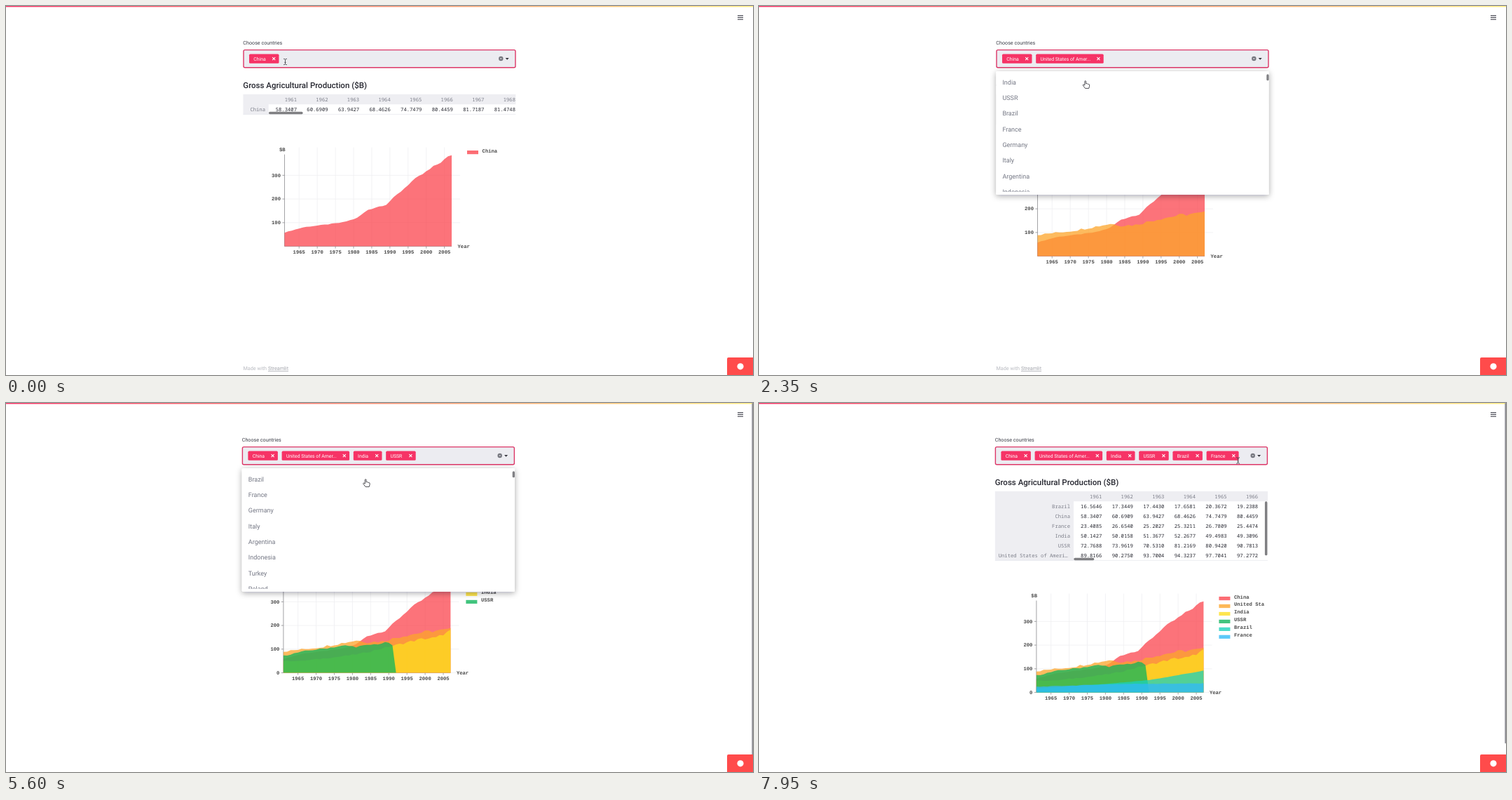
Recreate the animation shown at these times as an HTML page. Size 1066 by 526 pixels, loop 8 s.

```html
<!DOCTYPE html>
<html lang="en">
<head>
<meta charset="utf-8">
<title>Gross Agricultural Production</title>
<style>
  html, body { margin: 0; width: 100%; height: 100%; overflow: hidden; background: #fff; }
  svg { display: block; width: 1066px; height: 526px; font-family: Roboto, "Open Sans", sans-serif; text-rendering: geometricPrecision; }
  text { white-space: pre; }
  .label { font-size: 7.2px; fill: #3c3e48; }
  .title { font-size: 11.5px; font-weight: 500; fill: #262730; }
  .tag { font-size: 6.85px; fill: #fff; }
  .item { font-size: 9px; fill: #747784; }
  .foot { font-size: 7.25px; fill: #b9bbc1; }
  .cell { font: 7.2px "Noto Sans Mono", "DejaVu Sans Mono", monospace; fill: #262730; }
  .head { fill: #7c7e89; }
  .axis { font: bold 7.2px "Liberation Mono", "DejaVu Sans Mono", monospace; fill: #4a4a4a; }
</style>
</head>
<body>
<svg id="stage" viewBox="0 0 1066 526">
  <defs>
    <linearGradient id="bar"><stop stop-color="#f63366"/><stop offset="1" stop-color="#ffee80"/></linearGradient>
    <clipPath id="listClip"><rect x="338" y="93" width="390" height="172"/></clipPath>
    <clipPath id="tableClip"><rect x="338" y="120" width="389.6" height="120"/></clipPath>
    <filter id="shadow" x="-5%" y="-15%" width="110%" height="135%">
      <feDropShadow dx="0" dy="2" stdDeviation="4.5" flood-color="#101020" flood-opacity=".34"/>
    </filter>
  </defs>
</svg>
<script>
const LOOP = 8000, X0 = 397.5, STEP = 5.185, UNIT = 0.3375;
const COUNTRIES = ['China', 'United States of America', 'India', 'USSR', 'Brazil', 'France', 'Germany',
  'Italy', 'Argentina', 'Indonesia', 'Turkey', 'Poland', 'Spain'];
const TAG_WIDTHS = [42.5, 96.5, 40.7, 42.5, 42.5, 46], TAG_GAP = 5.7;

// keys: [years after 1961, value]; rough: relative size of the yearly wobble
const SERIES = [
  { color: 'rgb(251,68,78)', rough: 0.015, cells: '58.3407 60.6909 63.9427 68.4626 74.7479 80.4459 81.7187 81.4748',
    keys: [[0, 58], [5, 80], [16, 101], [20, 120], [23, 155], [28, 177], [35, 274], [46, 387]] },
  { color: 'rgb(253,164,42)', rough: 0.04, cells: '89.8166 90.2750 93.7004 94.3237 97.7041 97.2772',
    keys: [[0, 90], [10, 108], [20, 137], [23, 130], [27, 132], [33, 156], [39, 173], [46, 183]] },
  { color: 'rgb(254,222,30)', rough: 0.035, cells: '50.1427 50.0158 51.3677 52.2677 49.4983 49.3096',
    keys: [[0, 50], [5, 50], [15, 67], [21, 80], [29, 110], [38, 143], [42, 148], [46, 178]] },
  { color: 'rgb(14,180,90)', rough: 0.03, cells: '72.7688 73.9619 70.5310 81.2169 80.9420 90.7813',
    keys: [[0, 72], [6, 92], [17, 115], [20, 110], [29, 128], [30, 113], [31, 0], [46, 0]] },
  { color: 'rgb(26,210,187)', rough: 0.015, cells: '16.5646 17.3449 17.4430 17.6581 20.3672 19.2388',
    keys: [[0, 17], [19, 36], [31, 52], [46, 92]] },
  { color: 'rgb(48,186,247)', rough: 0.04, cells: '23.4085 26.6540 25.2027 25.3211 26.7809 25.4474',
    keys: [[0, 24], [23, 36], [46, 38]] }
];

// A list opens, the pointer reaches (x, y) and picks; the other times follow from these
const ROUNDS = [
  { open: 50, pick: 900, x: 392.5, y: 110 },
  { open: 1750, pick: 2500, x: 467, y: 112 },
  { open: 3300, pick: 4200, x: 484, y: 116 },
  { open: 5050, pick: 5800, x: 514.5, y: 114 },
  { open: 6650, pick: 7300, x: 596, y: 104 }
];
const RELOAD = 300, FADE = 100, SCROLL_SHIFT = 1.6;

const stage = document.getElementById('stage');
function el(name, attrs = {}, parent = stage, text) {
  const node = document.createElementNS('http://www.w3.org/2000/svg', name);
  for (const key in attrs) node.setAttribute(key, attrs[key]);
  if (text !== undefined) node.textContent = text;
  return parent.appendChild(node);
}
const group = (parent, attrs) => el('g', attrs, parent);
const rect = (parent, x, y, width, height, fill, rx = 0) => el('rect', { x, y, width, height, fill, rx }, parent);
const line = (parent, d, stroke, width = 0.8) => el('path', { d, stroke, 'stroke-width': width, fill: 'none' }, parent);
const label = (parent, cls, x, y, text, anchor = 'start') =>
  el('text', { class: cls, x, y, 'text-anchor': anchor }, parent, text);
const cross = (parent, x, y, r, color, width) =>
  line(parent, `M${x - r} ${y - r}l${2 * r} ${2 * r}m0 ${-2 * r}l${-2 * r} ${2 * r}`, color, width);

const clamp = v => Math.max(0, Math.min(1, v));
const ease = k => k * k * (3 - 2 * k);
const mix = (a, b, k) => a + (b - a) * k;
const noise = n => { const v = Math.sin(n * 12.9898) * 43758.5453; return 2 * (v - Math.floor(v)) - 1; };
const tagStart = i => TAG_WIDTHS.slice(0, i).reduce((x, w) => x + w + TAG_GAP, 347);
const tagEnd = i => tagStart(i) + TAG_WIDTHS[i];

function valueAt({ keys, rough }, year, seed) {
  const i = Math.max(1, keys.findIndex(k => k[0] >= year));
  const [t0, v0] = keys[i - 1], [t1, v1] = keys[i];
  return mix(v0, v1, (year - t0) / (t1 - t0)) * (1 + rough * noise(year + 50 * seed));
}

function drawTable(g, n) {
  const wide = n > 1, bottom = 140 + 14 * n, cols = wide ? 6 : 8;
  const split = wide ? 450.6 : 374.7, first = wide ? 490.9 : 415;
  const colX = i => first + 44.57 * i;
  const box = group(g, { 'clip-path': 'url(#tableClip)' });
  rect(box, 338.4, 125.8, 389.2, 14.4, '#eeeef2');
  rect(box, 338.4, 140, split - 338.4, 14 * n + 0.5, '#eeeef2');
  line(box, `M338.4 ${bottom + 0.4}H727.6`, '#e6e7ec', 0.7);
  for (let i = 0; i < cols; i++) label(box, 'cell head', colX(i), 135.8, 1961 + i, 'end');
  COUNTRIES.slice(0, n).sort().forEach((name, row) => {
    const y = 149.8 + 14 * row;
    if (name.length > 8) label(box, 'cell head', 343.3, y, name.slice(0, 22) + '…');
    else label(box, 'cell head', wide ? 445.6 : 370, y, name, 'end');
    const cells = SERIES[COUNTRIES.indexOf(name)].cells.split(' ');
    cells.slice(0, cols).forEach((v, i) => label(box, 'cell', colX(i), y, v, 'end'));
  });
  rect(box, split + 0.3, bottom - 3.2, wide ? 29 : 48.6, 3.4, '#7f7f82', 1.6);
  if (wide) rect(box, 723.5, 140.3, 3.5, 14 * n - 7, '#7f7f82', 1.6);
}

function drawChart(g, n) {
  const base = 328.6 + 14 * n, right = X0 + 46 * STEP;
  const yearX = year => X0 + (year - 1961) * STEP, valueY = v => base - v * UNIT;
  for (let year = 1965; year <= 2005; year += 5) {
    line(g, `M${yearX(year)} ${base - 141}V${base}`, '#efeff2');
    line(g, `M${yearX(year)} ${base}v3`, '#8c8c90');
    label(g, 'axis', yearX(year), base + 10.5, year, 'middle');
  }
  for (let v = n > 3 ? 0 : 100; v <= 300; v += 100) {
    line(g, `M${X0} ${valueY(v)}H648`, '#efeff2');
    line(g, `M${X0 - 3} ${valueY(v)}h3`, '#8c8c90');
    label(g, 'axis', 392, valueY(v) + 2.3, v, 'end');
  }
  line(g, `M${X0} ${base - 131}V${base}H${right}`, '#8c8c90');
  SERIES.slice(0, n).forEach((s, i) => {
    let d = `M${X0} ${base}`;
    for (let year = 0; year <= 46; year++) d += `L${X0 + year * STEP} ${valueY(valueAt(s, year, i))}`;
    el('path', { d: `${d}V${base}Z`, fill: s.color, 'fill-opacity': 0.75 }, g);
    const y = base - 136.6 + 10.95 * i;
    rect(g, 658, y, 16, 5.2, s.color).setAttribute('fill-opacity', 0.78);
    label(g, 'axis', 679.6, y + 2.5, COUNTRIES[i].slice(0, 10));
  });
  label(g, 'axis', 394.3, base - 136.1, '$B', 'middle');
  label(g, 'axis', 644.5, base + 2.5, 'Year');
}

function drawData(n) {
  const g = group(page);
  drawTable(g, n);
  drawChart(g, n);
  const foot = label(g, 'foot', 338.5, n < 3 ? 519 : 479.3 + 14 * n, 'Made with ');
  el('tspan', { fill: '#a3a5ac', 'text-decoration': 'underline' }, foot, 'Streamlit');
  return g;
}

function drawTag(width, i) {
  const g = group(page), x = tagStart(i), name = COUNTRIES[i];
  rect(g, x, 68.6, width, 13.2, '#f63366', 1.6);
  label(g, 'tag', x + 6.3, 77.5, name.length > 8 ? name.slice(0, 21) + '...' : name);
  cross(g, x + width - 7.3, 75.1, 2, '#fff', 1.1);
  return g;
}

function drawList(n) {
  const g = group(page);
  el('rect', { x: 338.3, y: 93, width: 389.3, height: 176, rx: 1.5, fill: '#fff', filter: 'url(#shadow)' }, g);
  const items = group(g, { 'clip-path': 'url(#listClip)' });
  COUNTRIES.slice(n, n + 8).forEach((name, i) => label(items, 'item', 347.4, 111.8 + 22.3 * i, name));
  rect(g, 724.3, 97.3, 3.3, 9, '#808084', 1.6);
  return g;
}

rect(stage, 0, 0, 1066, 1.4, 'url(#bar)');
line(stage, 'M1044 13.6h8m-8 2.8h8m-8 2.8h8', '#55565f', 1.2);
const page = group(stage);
label(page, 'label', 338.3, 55, 'Choose countries');
label(page, 'title', 338.3, 117, 'Gross Agricultural Production ($B)');
el('rect', { x: 339, y: 62.6, width: 388, height: 25.2, rx: 2, fill: '#ececf1', stroke: '#dc3667', 'stroke-width': 1.4 }, page);
el('circle', { cx: 706.3, cy: 75, r: 3.2, fill: '#74757d' }, page);
cross(page, 706.3, 75, 1.1, '#ececf1', 0.7);
el('path', { d: 'M712.7 73.9h5l-2.5 2.8z', fill: '#33343c' }, page);

const data = SERIES.map((_, i) => drawData(i + 1));
const tags = TAG_WIDTHS.map(drawTag);
const lists = ROUNDS.map((_, i) => drawList(i + 1));

const thumb = rect(stage, 1064.4, 0, 1.6, 526, '#8b8b91', 0.8);
el('path', { d: 'M1066 501h-35q-2 0-2 2v23h37z', fill: '#ff4b4b' });
el('circle', { cx: 1048, cy: 513.8, r: 4.6, fill: '#fff' });

const beam = line(stage, 'M-2.4 -4.2Q0 -4.2 0 -3Q0 -4.2 2.4 -4.2M0 -3V3M-2.4 4.2Q0 4.2 0 3Q0 4.2 2.4 4.2M-1 1h2', '#44454c', 0.9);
const hand = el('path', {
  d: 'M-2.2 1V-4.3q0-1 .9-1t.9 1V-1.2q1.4-.9 1.8.3 1.3-.6 1.7.5 1.5-.3 1.5 1.1V2.4L3.7 5.4H-1.5L-4.6 1.3q-.5-1 .5-1.3z',
  fill: '#fff', stroke: '#3a3a40', 'stroke-width': 0.9, 'stroke-linejoin': 'round'
});

const show = (node, on) => { node.style.display = on ? '' : 'none'; };
const home = i => ({ x: tagEnd(i) + 9 - (i > 1 ? SCROLL_SHIFT : 0), y: 79.5 });

// From beside the last tag down to the choice, then back up beside the new tag
function pointerAt(t) {
  const i = Math.max(0, ROUNDS.findLastIndex(r => t >= r.open)), round = ROUNDS[i];
  const leave = round.open + 50, arrive = round.pick - 200, back = round.pick + 250;
  const returning = t >= back;
  const from = returning ? round : home(i), to = returning ? home(i + 1) : round;
  const k = ease(clamp(returning ? (t - back) / 500 : (t - leave) / (arrive - leave)));
  return [mix(from.x, to.x, k), mix(from.y, to.y, k)];
}

function render(t) {
  const picked = 1 + ROUNDS.filter(r => t >= r.pick).length;
  const loaded = 1 + ROUNDS.filter(r => t >= r.pick + RELOAD).length;
  data.forEach((g, i) => show(g, i === loaded - 1));
  tags.forEach((g, i) => show(g, i < picked));
  lists.forEach((g, i) => {
    const { open, pick } = ROUNDS[i];
    const alpha = clamp((t - open) / FADE) * clamp((pick + FADE - t) / FADE);
    show(g, alpha > 0);
    g.setAttribute('opacity', alpha);
  });
  const scrolls = loaded > 2;
  page.setAttribute('transform', `translate(${scrolls ? -SCROLL_SHIFT : 0} 0)`);
  show(thumb, scrolls);
  thumb.setAttribute('height', 526 * 526 / (486 + 14 * Math.max(3, loaded)));
  const [x, y] = pointerAt(t), inField = y < 90;
  show(beam, inField);
  show(hand, !inField);
  (inField ? beam : hand).setAttribute('transform', `translate(${x} ${y})`);
}

const start = performance.now();
function tick(now) {
  render(Math.max(0, now - start) % LOOP);
  requestAnimationFrame(tick);
}
render(0);
requestAnimationFrame(tick);
</script>
</body>
</html>
```
